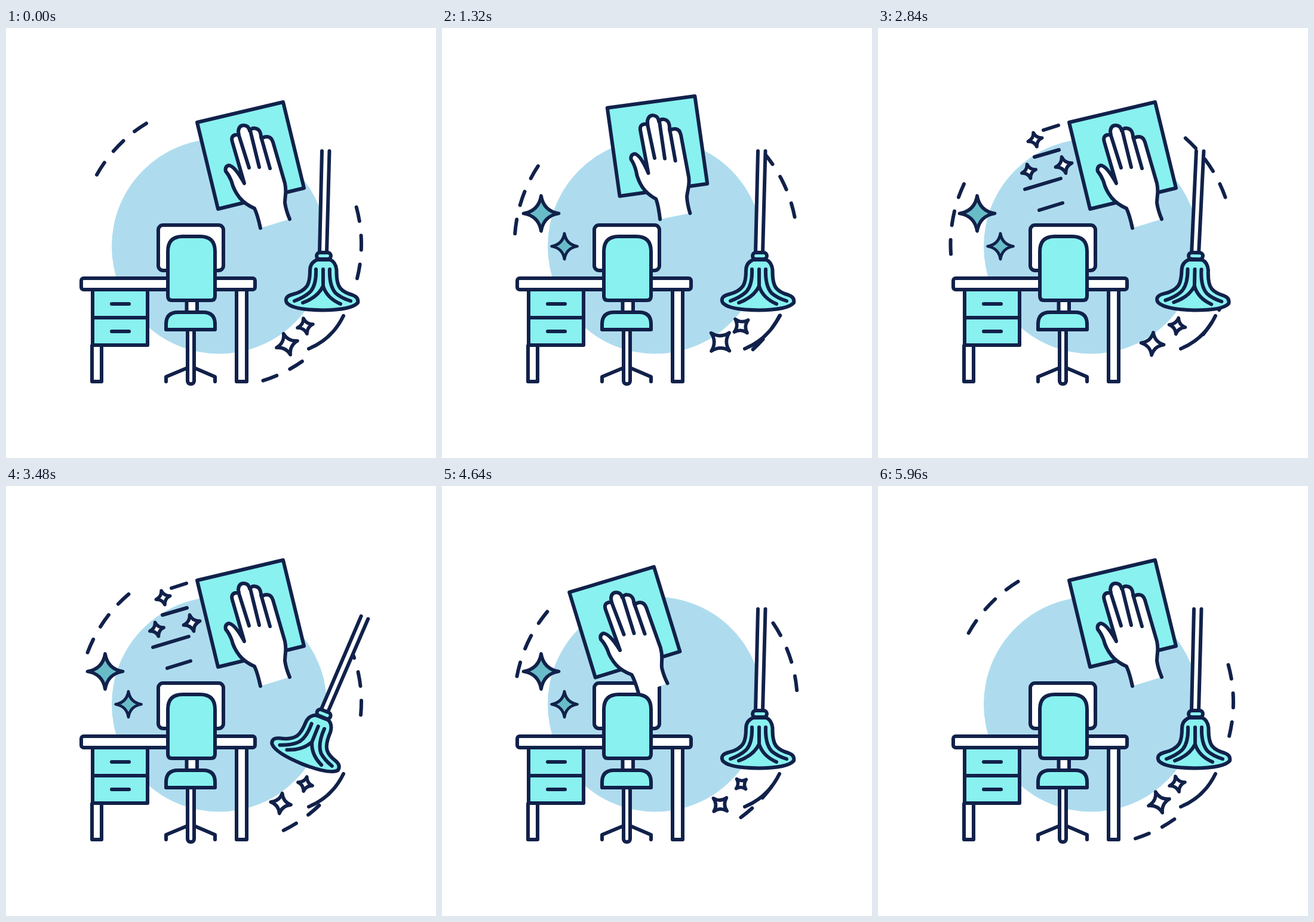
An HTML page for the animation above (6 s loop, 720x720 px).

```html
<!DOCTYPE html>
<html lang="en">
<head>
<meta charset="utf-8">
<title>Office cleaning</title>
<style>
  html, body { margin: 0; height: 100%; overflow: hidden; background: #fff; }
  svg { display: block; width: 100%; height: 100%; fill: none; stroke: #11214a; stroke-width: 6; stroke-linecap: round; stroke-linejoin: round; }
  .w { fill: #fff; }
  .c { fill: #89f1ef; }
  .n { stroke: none; }
  .star { vector-effect: non-scaling-stroke; }
</style>
</head>
<body>
<svg viewBox="0 0 720 720">
  <circle class="n" cx="357" cy="365.5" r="180" fill="#aedcee"/>
  <path id="dashes"/>
  <path d="M565 482Q546 521 507 537"/>
  <g id="lines"></g>
  <g id="stars"></g>

  <rect class="w" x="255" y="330" width="109" height="76" rx="8"/>

  <g id="hand">
    <path class="c" d="M320 158L464 124L499 268L355 303Z"/>
    <path class="w" d="M426 335Q421 312 416 302Q400 295 391 284Q381 271 378 258Q374 247 368 240Q366 232 373 230Q383 231 399 260L379 191Q376 181 384 179Q388 178 390 180L389 173Q390 163 398 163Q406 163 408 172Q412 167 417 168Q424 169 426 176L428 186Q431 182 437 182Q444 182 447 191L467 260Q469 270 468 279Q467 289 467 293Q469 306 475 320"/>
    <path d="M390 180L407 234M409 172L424 233M427 182L442 235"/>
  </g>

  <path class="w" d="M144 532V592H160V532M386 438V592H403V438"/>
  <rect class="c" x="145" y="438" width="92" height="93"/>
  <path d="M145 485H237M177 462H206M177 508H206"/>
  <rect class="w" x="126" y="419" width="291" height="19" rx="4"/>

  <path class="w" d="M302.5 456V476H320V456"/>
  <path class="c" d="M271 449V374Q271 349 296 349H325Q350 349 350 374V449Q350 456 343 456H278Q271 456 271 449Z"/>
  <path d="M304 569L268 584V592M315 569L350 584V592"/>
  <rect class="w" x="304" y="500" width="11" height="96" rx="5"/>
  <path class="c" d="M268 505V496Q268 476 288 476H330Q350 476 350 496V505Z"/>

  <g id="mop">
    <path class="w n" d="M529 206H541.5L537 376H525Z"/>
    <path d="M529 206L525 376M541.5 206L537 376"/>
    <path class="c" d="M521 388Q509 393 509 406Q509 424 504 432Q497 442 480 446Q465 450 470 460Q480 472 530 472.5Q579 472 589 460Q591 451 580 447Q566 443 560 436Q553 428 553.5 405Q552 392 543 388Z"/>
    <path d="M519 404Q520 432 508 443Q499 451 483 457M531 404V432Q522 451 497 460M531 432Q537 452 560 462M542 404Q541 432 552 444Q561 452 577 457"/>
    <rect class="c" x="520" y="376" width="24" height="11" rx="5.5"/>
  </g>
</svg>
<script>
const LOOP = 6000, WIPE = 3200, STROKE = 520;
const { sin, cos, PI, min, max } = Math;
const $ = id => document.getElementById(id);
const move = (id, value) => $(id).setAttribute('transform', value);

function add(parent, attrs) {
  const el = document.createElementNS('http://www.w3.org/2000/svg', 'path');
  for (const k in attrs) el.setAttribute(k, attrs[k]);
  return parent.appendChild(el);
}

const ease = x => (1 - cos(PI * min(1, max(0, x)))) / 2;
const ramp = (t, from, to) => ease((t - from) / (to - from));

// Ring of dashes: each group is first angle, count, radius
const point = (deg, r) => `${358.5 + r * cos(deg * PI / 180)} ${362 + r * sin(deg * PI / 180)}`;
const dash = (deg, r) => `M${point(deg, r)}A${r} ${r} 0 0 1 ${point(deg + 5.8, r)}`;
let ring = '';
for (const [first, count, r] of [[209.4, 3, 237], [-15.2, 3, 236.5], [55, 2, 239.5]])
  for (let i = 0; i < count; i++) ring += dash(first + i * 11.7, r);
$('dashes').setAttribute('d', ring);

// The ring turns back once a second
const turns = [0, -44, 37, -38, 24, -36, 0];
function ringAngle(t) {
  const i = Math.floor(t / 1000);
  return turns[i] + (turns[i + 1] - turns[i]) * ease(t / 1000 - i);
}

// Lift the cloth, wipe twice along an arc, put it back
function handMove(t) {
  const start = 1200, end = start + 2 * STROKE;
  const lift = ramp(t, start - STROKE, start) - ramp(t, end, end + STROKE);
  const wiping = min(end, max(start, t)) - start;
  const s = (1 - cos(2 * PI * wiping / STROKE)) / 2;
  const x = -4 * lift - 101 * s;
  const y = -23.5 * lift + 39 * s * s;
  const angle = -3.8 * lift + 9.5 * sin(PI * s);
  return `translate(${x} ${y}) rotate(${angle} 409.5 213.5)`;
}

const lines = ['M302 163L277 171', 'M303 204L262 216', 'M306 252L246 270', 'M309 293L270 305']
  .map(d => add($('lines'), { d, pathLength: 1, 'stroke-dasharray': '1 2' }));

// Four-pointed star of unit radius; c sets how deep the sides curve
function star(fill, c = .14) {
  const el = add($('stars'), {
    class: 'star', fill,
    d: `M0-1Q${c} ${-c} 1 0Q${c} ${c} 0 1Q${-c} ${c} -1 0Q${-c} ${-c} 0-1Z`
  });
  return (x, y, r, angle = 0) => {
    el.style.display = r < .5 ? 'none' : '';
    el.setAttribute('transform', `translate(${x} ${y}) rotate(${angle}) scale(${r})`);
    el.style.strokeWidth = min(5.7, r * .22 + (fill == '#fff' ? 3 : 0));
  };
}
const glints = [[166, 310.5, 29.5], [205, 365.5, 21.5]].map(p => [...p, star('#68bcc8')]);
const sparks = [[263, 187, 12], [252.5, 240, 12], [311, 229.5, 14]].map(p => [...p, star('#fff', .18)]);
const big = star('#fff', .18), small = star('#fff', .18);

function draw(t) {
  const a = 2 * PI * t / LOOP;
  move('dashes', `rotate(${ringAngle(t)} 358.5 362)`);
  move('hand', handMove(t % WIPE));
  move('mop', `rotate(${22 * sin(PI * ramp(t, 2500, 4400)) ** 2} 531 382)`);

  const shown = ramp(t, 1800, 2150) - ramp(t, 3650, 4000);
  for (const l of lines) {
    l.style.strokeDashoffset = 1 - shown;
    l.style.display = shown < .02 ? 'none' : '';
  }
  for (const [x, y, r, put] of sparks) put(x, y, r * shown, -14);

  const glow = ramp(t, 450, 900) - ramp(t, 5050, 5600);
  for (const [x, y, r, put] of glints) put(x, y, r * glow);

  // Sparkles by the mop circle, sway and swell once per loop
  const sway = 34 * cos(a);
  big(465 + 5.5 * cos(a), 529.5 - 4 * sin(a), 18.5 + 3 * sin(a), sway - 52);
  small(501, 499, 13.3 + 2 * sin(a), sway - 47);
}

const start = performance.now();
function frame() {
  draw((performance.now() - start) % LOOP);
  requestAnimationFrame(frame);
}
frame();
</script>
</body>
</html>
```
